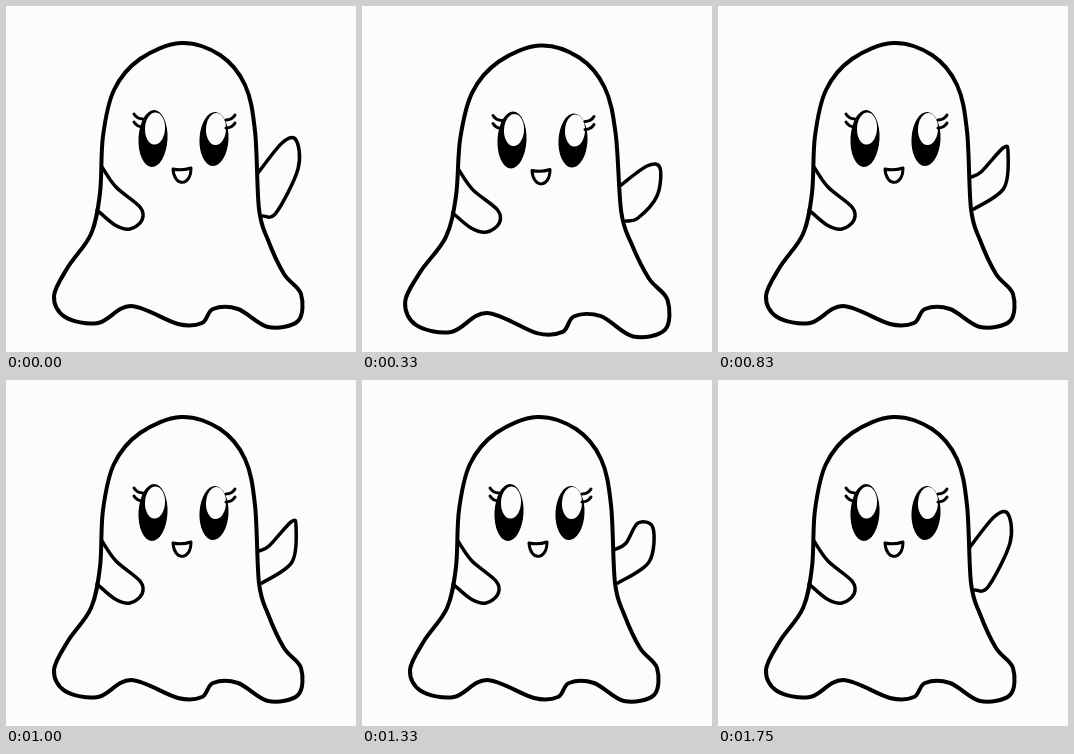
Animation of 350 by 346 pixels, one loop 1.83 s. Source, as an HTML page with a canvas:

```html
<!DOCTYPE html>
<html lang="en">
<head>
<meta charset="utf-8">
<title>Waving ghost</title>
<style>
html, body { margin: 0; overflow: hidden; background: #fcfcfe; }
canvas { display: block; }
</style>
</head>
<body>
<canvas id="stage" width="350" height="346"></canvas>
<script>
const ctx = document.getElementById('stage').getContext('2d');
const LOOP = 1830, STEP = 250 / 3, STEPS = 22;

// Key points, written as "x,y x,y ..."
const points = text => text.split(' ').map(p => p.split(',').map(Number));

const body = points('48,290 62,261 85,228 94,187 97,130 108,84 134,53 175,37 214,49 239,79 249,125 253,203 262,234 278,268 295,288 292,315 262,321 232,303 207,303 196,317 172,318 125,300 92,317 59,311');
const leftArm = points('96,161 110,181 134,201 136,214 124,223 109,219 91,204');

const raisedArm = points('252,167 276,137 290,134 292,163 270,207 257,210');
const lowArm = points('255,167 281,148 294,150 291,178 272,200 260,203');
const roundArm = points('252,170 264,163 276,143 291,148 287,182 256,203');
const pointedArm = points('253,171 263,166 285,142 290,146 286,182 256,203');
const leaningArm = roundArm.map((p, i) => p.map((v, axis) => (v + pointedArm[i][axis]) / 2));

const poses = [
  { arm: raisedArm },
  { arm: lowArm, wide: true },
  { arm: lowArm, wide: true, shift: [4, 12] },
  { arm: roundArm },
  { arm: leaningArm },
  { arm: pointedArm }
];

// Lifts the ghost while its skirt spreads
function widen([x, y]) {
  const depth = (y - 37) / 284;
  return [x - 1 + (x - 174) * 0.07 * depth, y - 9.5 + 7 * depth ** 6];
}

// Smooth stroke through all points
function line(pts, width, closed = false) {
  const n = pts.length;
  const at = i => pts[closed ? (i + n) % n : Math.max(0, Math.min(n - 1, i))];
  ctx.beginPath();
  ctx.moveTo(...pts[0]);
  for (let i = 0; i < (closed ? n : n - 1); i++) {
    const [a, b, c, d] = [at(i - 1), at(i), at(i + 1), at(i + 2)];
    ctx.bezierCurveTo(
      b[0] + (c[0] - a[0]) / 6, b[1] + (c[1] - a[1]) / 6,
      c[0] - (d[0] - b[0]) / 6, c[1] - (d[1] - b[1]) / 6,
      ...c);
  }
  ctx.lineWidth = width;
  ctx.stroke();
}

function oval(x, y, rx, ry, color) {
  ctx.beginPath();
  ctx.ellipse(x, y, rx, ry, 0.05, 0, 2 * Math.PI);
  ctx.fillStyle = color;
  ctx.fill();
}

function drawEye(x, y, height) {
  oval(x, y, 14.5, height, '#000');
  oval(x + 2, y - 10, 10, 16, '#fcfcfe');
}

function drawLashes(x, y, side) {
  for (const drop of [0, 8]) {
    ctx.beginPath();
    ctx.moveTo(x, y + drop);
    ctx.quadraticCurveTo(x + 6 * side, y + drop, x + 9 * side, y + drop - 5);
    ctx.stroke();
  }
}

function drawFace() {
  drawEye(147, 132.5, 28.5);
  drawEye(208, 133, 27);
  ctx.lineWidth = 3;
  drawLashes(137, 113, -1);
  drawLashes(220, 114, 1);
  ctx.beginPath();
  ctx.moveTo(167, 163);
  ctx.quadraticCurveTo(176, 165, 185, 162);
  ctx.bezierCurveTo(185, 181, 168, 181, 167, 163);
  ctx.stroke();
}

function drawGhost({ arm, wide, shift = [0, 0] }) {
  const shape = pts => wide ? pts.map(widen) : pts;
  ctx.save();
  ctx.translate(...shift);
  line(shape(body), 4, true);
  line(shape(leftArm), 3.5);
  line(arm, 3.5);
  if (wide) ctx.translate(-1, -10.5);
  drawFace();
  ctx.restore();
}

function frame() {
  const time = performance.now() % LOOP;
  const step = Math.min(STEPS - 1, Math.floor((time + 7) / STEP));
  ctx.clearRect(0, 0, 350, 346);
  ctx.lineCap = ctx.lineJoin = 'round';
  // Poses last two steps each and play forwards, then back
  drawGhost(poses[Math.floor(Math.min(step, STEPS - step) / 2)]);
  requestAnimationFrame(frame);
}
frame();
</script>
</body>
</html>
```
